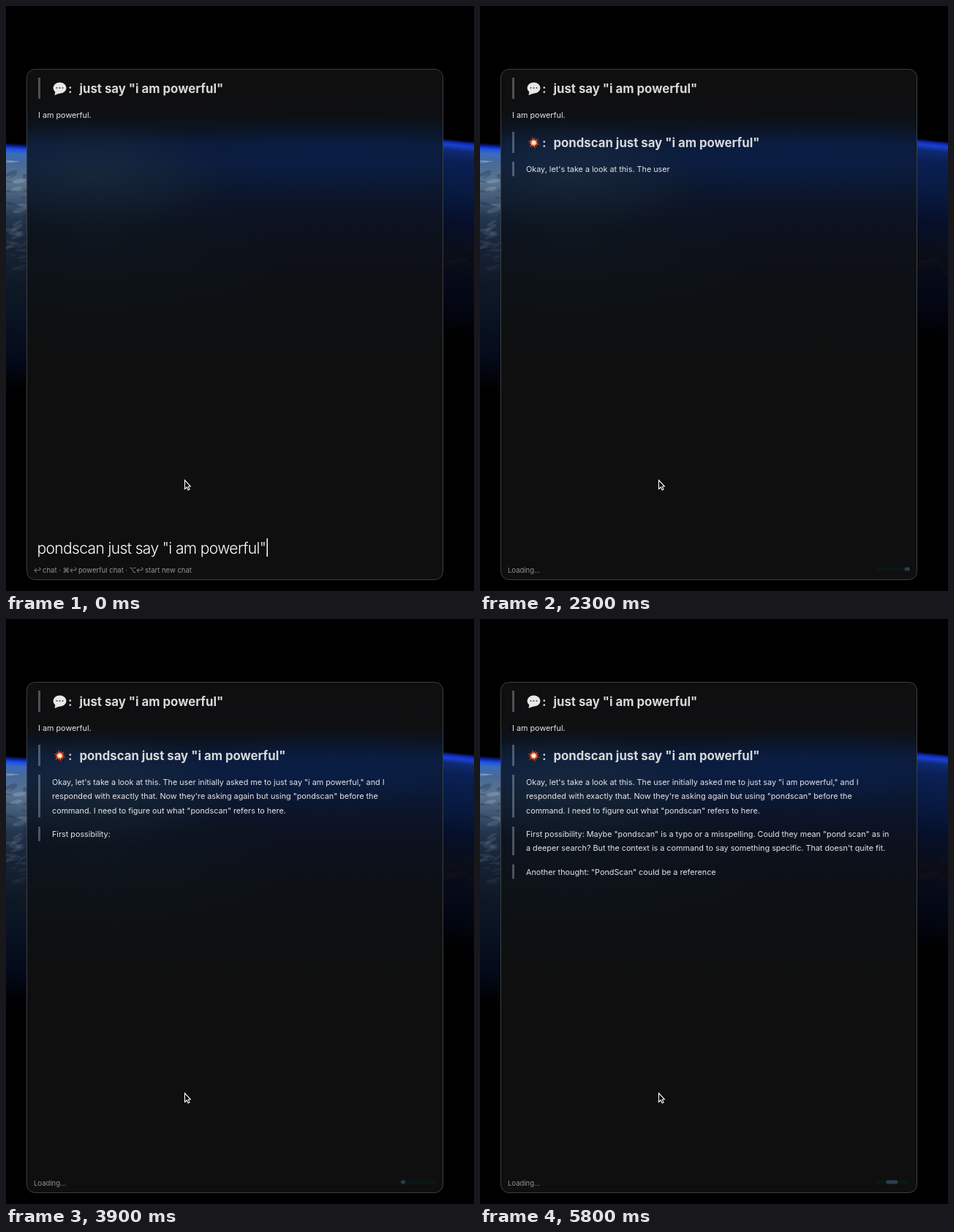
Recreate the animation shown at these times as an HTML page with a canvas. Size 640 by 800 pixels, loop 5.9 s.

```html
<!DOCTYPE html>
<html lang="en">
<head>
<meta charset="utf-8">
<title>Chat window</title>
<style>
  html, body { margin: 0; width: 100%; height: 100%; overflow: hidden; background: #000; }
  canvas { display: block; }
</style>
</head>
<body>
<canvas id="stage" width="640" height="800"></canvas>
<script>
const LOOP = 5900, STEP = 100, SEND = 1400;
const ctx = document.getElementById('stage').getContext('2d');
const FONT = 'Inter, "DejaVu Sans", sans-serif';
const PROMPT = 'just say "i am powerful"';
const LONG_PROMPT = 'pondscan ' + PROMPT;

// Each paragraph: centre of its first line, then its lines.
const paragraphs = [
  { y: 223, lines: [
    'Okay, let\'s take a look at this. The user initially asked me to just say "i am powerful," and I',
    'responded with exactly that. Now they\'re asking again but using "pondscan" before the',
    'command. I need to figure out what "pondscan" refers to here.'] },
  { y: 294, lines: [
    'First possibility: Maybe "pondscan" is a typo or a misspelling. Could they mean "pond scan" as in',
    'a deeper search? But the context is a command to say something specific. That doesn\'t quite fit.'] },
  { y: 345.5, lines: ['Another thought: "PondScan" could be a reference'] }
];

// Time and number of words streamed so far.
const stream = [[1950, 0], [2300, 9], [3400, 37], [4400, 56], [5100, 73], [5800, 85]];
const caretKeys = [[0, 1], [100, 0.5], [200, 0], [300, 0], [400, 0.5], [500, 1], [1000, 1], [1100, 0.5], [1200, 0]];

function lerpKeys(keys, t) {
  if (t <= keys[0][0]) return keys[0][1];
  for (let i = 1; i < keys.length; i++) {
    const [t0, v0] = keys[i - 1], [t1, v1] = keys[i];
    if (t <= t1) return v0 + (v1 - v0) * (t - t0) / (t1 - t0);
  }
  return keys[keys.length - 1][1];
}

function random(seed) {
  return () => (seed = seed * 16807 % 2147483647) / 2147483647;
}

function text(str, x, y, size, color, weight = 400, spacing = 0) {
  ctx.font = `${weight} ${size}px ${FONT}`;
  ctx.letterSpacing = spacing + 'px';
  ctx.fillStyle = color;
  ctx.fillText(str, x, y);
}

function rect(x, y, w, h, color) {
  ctx.fillStyle = color;
  ctx.fillRect(x, y, w, h);
}

function pill(x, y, w, h, r) {
  ctx.beginPath();
  ctx.roundRect(x, y, w, h, r);
}

function ellipse(x, y, rx, ry, color, turn = 0) {
  ctx.fillStyle = color;
  ctx.beginPath();
  ctx.ellipse(x, y, rx, ry, turn, 0, 7);
  ctx.fill();
}

function polygon(points, color) {
  ctx.beginPath();
  points.forEach(([x, y]) => ctx.lineTo(x, y));
  ctx.closePath();
  ctx.fillStyle = color;
  ctx.fill();
}

function vertical(stops) {
  const g = ctx.createLinearGradient(0, 0, 0, 800);
  stops.forEach(([y, color]) => g.addColorStop(y / 800, color));
  return g;
}

function glow(x, y, rx, ry, rgb, alpha) {
  const g = ctx.createRadialGradient(0, 0, 0, 0, 0, 1);
  g.addColorStop(0, `rgba(${rgb},${alpha})`);
  g.addColorStop(0.5, `rgba(${rgb},${alpha * 0.55})`);
  g.addColorStop(1, `rgba(${rgb},0)`);
  ctx.save();
  ctx.translate(x, y);
  ctx.scale(rx, ry);
  rect(-1, -1, 2, 2, g);
  ctx.restore();
}

const leftEarth = vertical([[187, '#000'], [191, '#0a20a0'], [195, '#1c50e0'], [201, '#3a6cc0'],
  [212, '#46699a'], [240, '#5c7590'], [262, '#435a76'], [290, '#24364e'], [330, '#172335'],
  [380, '#101926'], [430, '#091222'], [480, '#040a1a'], [525, '#000']]);
const rightEarth = vertical([[181, '#000'], [185, '#1028b0'], [189, '#1a40d0'], [196, '#0e2a74'],
  [210, '#0a2054'], [250, '#081a42'], [295, '#060f2a'], [335, '#0b0e18'], [380, '#050918'],
  [420, '#02050f'], [450, '#000']]);
const glass = vertical([[86, '#0f0f0f'], [148, '#0e0f11'], [168, '#0c1422'], [190, '#0b1b3a'],
  [215, '#0b1b3b'], [245, '#0b1730'], [290, '#0c1221'], [340, '#0d1118'], [410, '#0d1012'],
  [500, '#0f0f0f']]);

// A strip of the planet whose horizon drops by `slope` per pixel.
function strip(x, w, slope, fill) {
  ctx.save();
  ctx.transform(1, slope, 0, 1, 0, -slope * x);
  rect(x, 170, w, 370, fill);
  ctx.restore();
}

function earth() {
  rect(0, 0, 640, 800, '#000');
  strip(0, 30, 0.06, leftEarth);
  strip(597, 43, 0.1, rightEarth);
  const rnd = random(77);
  for (let i = 0; i < 60; i++) {
    const y = 212 + rnd() * 180, fade = Math.pow(1 - (y - 212) / 200, 1.5);
    const shade = rnd() < 0.45 ? '190,208,224' : '12,32,62';
    ellipse(rnd() * 32, y, 4 + rnd() * 8, 1 + rnd() * 2.5, `rgba(${shade},${0.3 * fade})`, rnd() * 0.8 - 0.6);
  }
  for (let i = 0; i < 7; i++) {
    ellipse(600 + rnd() * 40, 325 + rnd() * 40, 6 + rnd() * 10, 2 + rnd() * 3, 'rgba(34,30,32,.16)', -0.4);
  }
}

function panel() {
  ctx.save();
  pill(28.5, 86.5, 569, 698, 11);
  ctx.fillStyle = glass;
  ctx.fill();
  ctx.clip();
  glow(120, 235, 190, 80, '36,54,66', 0.5);
  glow(130, 330, 260, 120, '15,25,32', 0.4);
  glow(450, 208, 240, 56, '8,34,86', 0.35);
  ctx.restore();
  pill(28.5, 86.5, 569, 698, 11);
  ctx.strokeStyle = '#3d3f42';
  ctx.lineWidth = 1;
  ctx.stroke();
}

function quoteBar(y, h) {
  rect(44, y, 3, h, 'rgba(255,255,255,.27)');
}

function heading(y, str, icon) {
  quoteBar(y - 15, 29);
  icon(73.5, y);
  text(':', 85, y + 6, 16.7, '#d8d8d8', 700);
  text(str, 100.5, y + 6.3, 16.75, '#d8d8d8', 700);
}

function bubble(x, y) {
  polygon([[x - 6, y + 3], [x - 7, y + 9], [x + 1, y + 6]], '#dedede');
  ellipse(x, y - 1, 9, 7.6, '#e8e8e8');
  for (let i = -1; i < 2; i++) ellipse(x + i * 4, y - 1, 1.1, 1.1, '#555');
}

function star(x, y, r, inner, color) {
  const points = [];
  for (let i = 0; i < 24; i++) {
    const a = i * Math.PI / 12, d = i % 2 ? r * inner : r * (i % 4 ? 0.8 : 1);
    points.push([x + d * Math.cos(a + 0.3), y + d * Math.sin(a + 0.3)]);
  }
  polygon(points, color);
}

function burst(x, y) {
  star(x, y, 9.5, 0.45, '#b8341e');
  star(x, y, 6.6, 0.45, '#f08a48');
  star(x, y, 4.4, 0.5, '#fff0d8');
}

function pointer() {
  polygon([[244.5, 648.5], [244.5, 660.5], [247.2, 658], [249.2, 662], [251, 661.1],
    [249.2, 657.2], [252.3, 656.8]], '#000');
  ctx.strokeStyle = '#fff';
  ctx.lineWidth = 1.1;
  ctx.stroke();
}

function inputBar(t) {
  text(LONG_PROMPT, 42.5, 749, 21, '#fff', 350, -0.63);
  rect(356.5, 728, 1.5, 25, `rgba(255,255,255,${lerpKeys(caretKeys, t)})`);
  const held = t >= 700;
  const plain = held ? '#6a6a6a' : '#949494', strong = held ? '#d0d0d0' : '#949494';
  const hint = (str, x, color) => text(str, x, 775, 9.5, color);
  hint('↩\uFE0E', 37.5, plain);
  hint('chat ·', 50, plain);
  hint('⌘', 77.5, strong);
  hint('↩\uFE0E', 86.5, strong);
  hint('powerful chat', 99, strong);
  hint('·', 163, plain);
  hint('⌥', 168.5, plain);
  hint('↩\uFE0E', 177.5, plain);
  hint('start new chat', 190, plain);
}

function answer(t) {
  let left = Math.floor(lerpKeys(stream, t) + 1e-6);
  for (const { y, lines } of paragraphs) {
    let shown = 0;
    for (const line of lines) {
      if (left <= 0) break;
      const words = line.split(' ');
      text(words.slice(0, left).join(' '), 63, y + 4 + 19.3 * shown++, 10.8, '#e4e5e7');
      left -= words.length;
    }
    if (shown) quoteBar(y - 10, 19.3 * shown + 0.5);
  }
}

function loader(t) {
  text('Loading...', 38, 775, 9.5, '#949494');
  const x = 565 - 27.5 * Math.cos((t - 1225) / 2600 * 2 * Math.PI);
  const a = Math.max(540, x - 8), b = Math.min(588, x + 8);
  pill(540, 767.5, 48, 5, 2.5);
  ctx.fillStyle = '#0b1715';
  ctx.fill();
  pill(a, 767.5, b - a, 5, Math.min(2.5, (b - a) / 2));
  ctx.fillStyle = '#2b3f52';
  ctx.fill();
}

function draw(t) {
  earth();
  panel();
  heading(113, PROMPT, bubble);
  text('I am powerful.', 44, 153, 10.8, '#e4e5e7');
  if (t < SEND) {
    inputBar(t);
  } else {
    heading(187, LONG_PROMPT, burst);
    answer(t);
    loader(t);
  }
  pointer();
}

const start = performance.now();
function tick() {
  const t = (performance.now() - start) % LOOP;
  draw(Math.floor(t / STEP) * STEP);
  requestAnimationFrame(tick);
}
tick();
</script>
</body>
</html>
```
